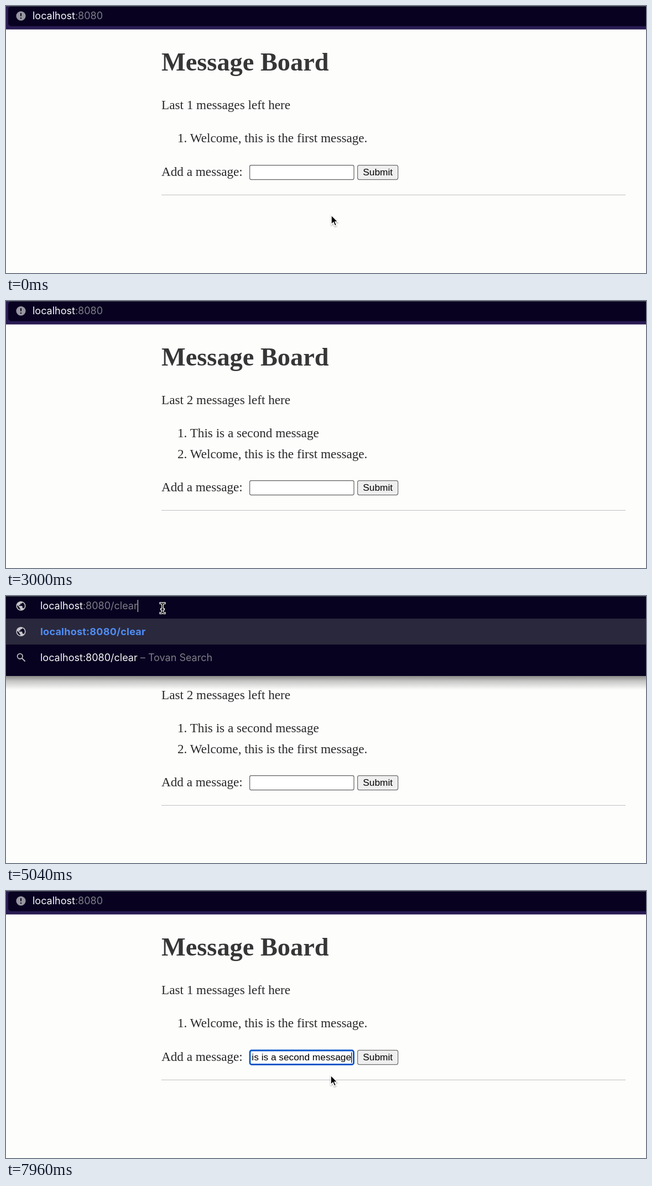
Write an HTML page that moves like this. It is 1157x484 px and loops after 8000 ms.

```html
<!DOCTYPE html>
<html lang="en">
<head>
<meta charset="utf-8">
<title>Message Board</title>
<style>
  html, body { margin: 0; width: 100%; height: 100%; overflow: hidden; background: #fdfdfc; }
  svg { display: block; width: 1157px; height: 484px; }
  text { white-space: pre; }
  .page text { font: 23.2px "Liberation Serif", "Times New Roman", serif; fill: #292929; }
  .page .title { font-size: 46.35px; font-weight: 700; fill: #363636; }
  .page .ctl { font: 17.3px "Liberation Sans", Arial, sans-serif; fill: #000; }
  .bar text { font: 18px Inter, Roboto, sans-serif; fill: #f8f8fa; }
  .bar .dim { fill: #7f7d88; }
  .bar .hit { fill: #4f8df5; font-weight: 700; letter-spacing: .24px; }
</style>
</head>
<body>
<svg viewBox="0 0 1157 484">
  <defs>
    <linearGradient id="fade" x2="0" y2="1">
      <stop offset="0" stop-color="#000" stop-opacity=".48"/>
      <stop offset=".4" stop-color="#000" stop-opacity=".22"/>
      <stop offset="1" stop-color="#000" stop-opacity="0"/>
    </linearGradient>
    <clipPath id="inside"><rect x="444.5" y="289" width="181" height="26"/></clipPath>
    <filter id="soft" x="-50%" y="-50%" width="200%" height="200%">
      <feDropShadow dx="0" dy="1.5" stdDeviation="1.2" flood-opacity=".35"/>
    </filter>
    <g id="globe" transform="scale(.86)">
      <circle r="10" fill="#c6c5cb"/>
      <path d="M-1 7.9A8 8 0 0 1-7.8-1.8L-3 3V4Q-3 6-1 6ZM5.9 5.4Q5.4 4 4 4H3V1Q3 0 2 0H-4V-2H-2Q-1-2-1-3V-5H1Q3-5 3-7V-7.4A8 8 0 0 1 5.9 5.4Z" fill="#0a0522"/>
    </g>
  </defs>

  <rect width="1157" height="484" fill="#fdfdfc"/>

  <g class="page">
    <text class="title" x="281" y="116.5">Message Board</text>
    <text id="count" x="281" y="187"></text>
    <text id="item1" x="309.9" y="247"></text>
    <text id="item2" x="309.9" y="284.5">2. Welcome, this is the first message.</text>
    <g id="form">
      <text x="281" y="307.7">Add a message:</text>
      <rect id="field" fill="#fff"/>
      <g clip-path="url(#inside)"><text id="typed" class="ctl" y="307"></text></g>
      <rect id="caret" y="292.5" width="1.2" height="19"/>
      <rect x="635.6" y="288.6" width="73" height="26" rx="3" fill="#efefef" stroke="#6c6c6c" stroke-width="1.2"/>
      <text class="ctl" x="645.3" y="307">Submit</text>
      <path d="M281 342.5H1120" stroke="#bfbfbf" stroke-width="1.2"/>
    </g>
  </g>

  <g class="bar">
    <rect width="1157" height="42.5" fill="#291b52"/>
    <rect id="box" x="4" y="1" width="1170" height="35.5" rx="5"/>
    <g id="drop">
      <rect y="144" width="1157" height="26" fill="url(#fade)"/>
      <rect width="1157" height="145" fill="#070220"/>
      <rect y="41" width="1157" height="47" fill="#2a283c"/>
      <use href="#globe" x="31.4" y="75"/>
      <text id="hit" class="hit" x="62" y="71"></text>
      <g fill="none" stroke="#bdbcc4" stroke-width="1.8">
        <circle cx="25.3" cy="109.3" r="4.7"/>
        <path d="M29 113L34.5 118.5"/>
      </g>
      <text id="query" x="62" y="117.5"></text>
      <text id="engine" class="dim" y="117.5"> – Tovan Search</text>
    </g>
    <path d="M0 .5H1157" stroke="#4b4a50"/>
    <g id="info">
      <circle cx="27" cy="18" r="8.6" fill="#97959f"/>
      <path d="M27 13V18.6M27 20.9V23" stroke="#0a0522" stroke-width="2.1"/>
    </g>
    <use id="world" href="#globe" x="27" y="18"/>
    <text id="url" y="24.4"><tspan>localhost</tspan><tspan id="rest" class="dim"></tspan></text>
    <rect id="urlCaret" y="7" width="1.2" height="22" fill="#c9c8d0"/>
  </g>

  <g id="mouse">
    <circle id="ring" r="21" fill="none" stroke="#000" stroke-width="2"/>
    <path id="arrow" d="M0 0V17L4 13.3 6.6 19.5 9.6 18.2 7 12.2 12 12Z" stroke="#fff" stroke-width="1.5" filter="url(#soft)"/>
    <g id="beam" fill="none" stroke-linecap="square">
      <path d="M-3.5-9Q0-9 0-6V6Q0 9-3.5 9M3.5-9Q0-9 0-6V6Q0 9 3.5 9M-2 2H2" stroke="#fff" stroke-width="4"/>
      <path d="M-3.5-9Q0-9 0-6V6Q0 9-3.5 9M3.5-9Q0-9 0-6V6Q0 9 3.5 9M-2 2H2" stroke="#000" stroke-width="1.5"/>
    </g>
  </g>
</svg>

<script>
const LOOP = 8000, MESSAGE = "This is a second message";
const el = {};
document.querySelectorAll("[id]").forEach(n => el[n.id] = n);

// Both globes share one icon, placed by their centre
document.querySelectorAll("use").forEach((u, i) => {
  u.setAttribute("x", 27);
  u.setAttribute("y", i ? 18 : 64.5);
});

// Pointer stops: time, x, y
const stops = [
  [0, 588, 379], [80, 588, 379], [340, 520, 298], [480, 520, 298], [760, 588, 337],
  [1400, 588, 337], [1660, 665, 311], [2250, 665, 311], [2640, -30, 20], [2960, -30, 20],
  [3480, 286, 27], [3640, 286, 27], [3880, 284, 21], [4640, 284, 21], [4760, 283, 22],
  [5600, 283, 22], [6200, 508, 296], [6420, 508, 296], [6720, 587, 334], [LOOP, 587, 334]
];
const clicks = [[340, 480], [1640, 1760], [6240, 6400]];

const within = (t, a, b) => t >= a && t < b;
const show = (node, on) => node.setAttribute("visibility", on ? "visible" : "hidden");
const set = (node, attrs) => { for (const k in attrs) node.setAttribute(k, attrs[k]); };
const write = (node, s) => { if (node.textContent !== s) node.textContent = s; };
const blink = (t, from) => (t - from) % 1000 < 500;

function typing(s, t, a, b) {
  const p = Math.max(0, Math.min(1, (t - a) / (b - a)));
  return s.slice(0, Math.floor(p * s.length + 1e-6));
}

function pointer(t) {
  const i = stops.findIndex((s, k) => k && t < s[0]);
  const [a, x, y] = stops[i - 1], [b, u, v] = stops[i];
  const p = (t - a) / (b - a), e = p * p * (3 - 2 * p);
  return [x + (u - x) * e, y + (v - y) * e];
}

function drawForm(t) {
  const two = within(t, 1760, 5200), dy = two ? 37 : 0;
  write(el.count, `Last ${two ? 2 : 1} messages left here`);
  write(el.item1, two ? "1. " + MESSAGE : "1. Welcome, this is the first message.");
  show(el.item2, two);
  set(el.form, { transform: `translate(0 ${dy})` });

  const focus = within(t, 360, 2800) || t >= 6280;
  set(el.field, focus
    ? { x: 441, y: 289, width: 187.5, height: 25.5, rx: 3, stroke: "#0b57c8", "stroke-width": 2.8 }
    : { x: 440.6, y: 288.6, width: 188.4, height: 26, rx: 2.5, stroke: "#606060", "stroke-width": 1.2 });

  let s = "";
  if (t < 1760) s = typing(MESSAGE, t, 520, 1400);
  if (t >= 6280) s = typing(MESSAGE, t, 6520, 7920);
  write(el.typed, s);
  const w = s ? el.typed.getComputedTextLength() : 0;
  const x = Math.min(445, 624 - w);
  set(el.typed, { x });
  set(el.caret, { x: x + w });
  const busy = within(t, 520, 1500) || t >= 6520;
  show(el.caret, focus && (busy || blink(t, t < 1760 ? 360 : t < 6000 ? 1760 : 6280)));
  return dy;
}

function drawBar(t, x, y) {
  const editing = within(t, 3840, 5140), open = within(t, 4480, 5140);
  const tail = editing ? typing("/clear", t, 4300, 4900) : "";
  write(el.rest, ":8080" + tail);
  set(el.url, { x: editing ? 62 : 48 });
  show(el.info, !editing);
  show(el.world, editing);
  show(el.urlCaret, editing && (t > 4300 || blink(t, 3840)));
  set(el.urlCaret, { x: 62 + el.url.getComputedTextLength() });
  const hover = !editing && x > 4 && y < 36;
  set(el.box, { fill: hover ? "#151228" : "#080220" });

  set(el.drop, { display: open ? "inline" : "none" });
  if (open) {
    const full = "localhost:8080" + tail;
    write(el.hit, full);
    write(el.query, full);
    set(el.engine, { x: 62 + el.query.getComputedTextLength() });
  }
}

function draw(t) {
  const [x, y] = pointer(t), dy = drawForm(t);
  drawBar(t, x, y);
  const inField = x > 440 && x < 630 && y > 288 + dy && y < 316 + dy;
  const inBar = y < 37 && !within(t, 4200, 4640);
  show(el.beam, inField || inBar);
  show(el.arrow, !inField && !inBar);
  show(el.ring, clicks.some(([a, b]) => within(t, a, b)));
  set(el.mouse, { transform: `translate(${x} ${y})` });
}

const start = performance.now();
function tick(now) {
  draw(Math.max(0, now - start) % LOOP);
  requestAnimationFrame(tick);
}
draw(0);
requestAnimationFrame(tick);
</script>
</body>
</html>
```
